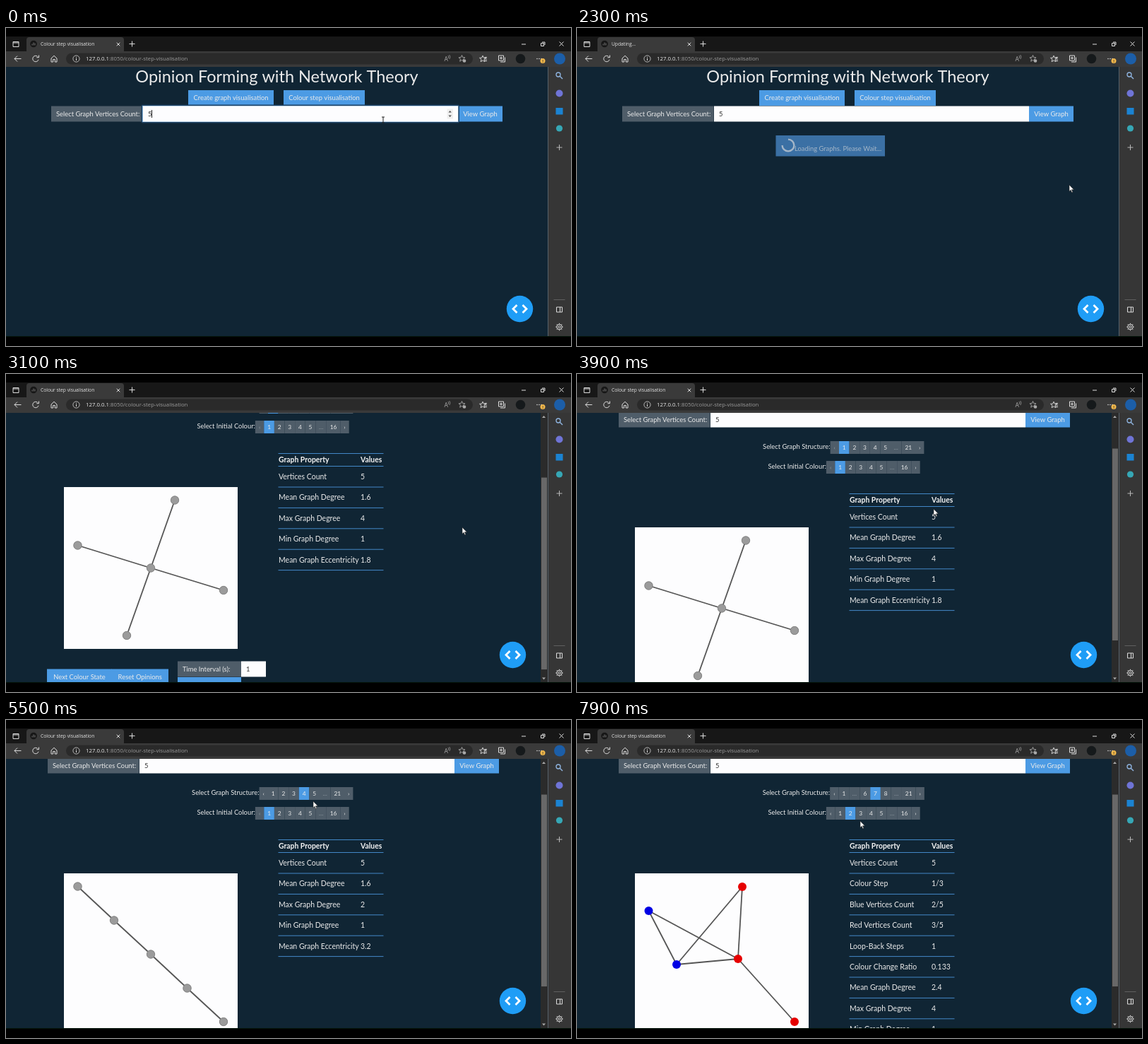
Recreate the animation shown at these times as an HTML page with a canvas. Size 800 px wide and 450 px high, loop 8 s.

```html
<!DOCTYPE html>
<html lang="en">
<head>
<meta charset="utf-8">
<title>Colour step visualisation</title>
<style>
html, body { margin: 0; width: 100%; height: 100%; overflow: hidden; background: #000; }
canvas { display: block; }
</style>
</head>
<body>
<canvas id="stage" width="800" height="450"></canvas>
<script>
const ctx = document.getElementById('stage').getContext('2d');
const LOOP = 8000, LOADED = 2500;
const LATO = 'Lato, sans-serif', UI = '"Open Sans", sans-serif';
const BG = '#102534', BLUE = '#4c9be4', BLUE_HOVER = '#4184c3', GREY = '#4f5d69', LIGHT = '#ebebeb';

// [time, x, y] of the pointer tip; [time, offset] of the page scroll
const POINTER = [[0, 534, 130], [200, 534, 130], [800, 668, 124], [1200, 670, 124], [1700, 688, 180],
  [2300, 697, 222], [2600, 694, 222], [2700, 694, 222], [3100, 646, 217], [3300, 642, 216], [3400, 642, 216],
  [3900, 505, 191], [4400, 394, 105], [4800, 394, 105], [4900, 408, 105], [5100, 408, 105], [5200, 422, 105],
  [5300, 424, 106], [5500, 435, 115], [5650, 438, 107], [6300, 440, 106], [6600, 444, 105], [6900, 440, 105],
  [7300, 388, 132], [7550, 388, 132], [7900, 401, 143]];
const SCROLL = [[2700, 0], [3000, 114], [3400, 114], [3700, 57]];
const CLICKS = [4600, 5000, 5300, 5700, 6100, 6900];
const COLOUR_CLICK = 7500;

// Vertex positions are on screen at a scroll of 57
const GRAPHS = [
  { at: [[205, 331.5], [239, 235.5], [101.5, 299.5], [308, 363], [171, 427]], edges: '01 02 03 04', stats: ['1.6', 4, 1, '1.8'] },
  { at: [[180, 318], [101.5, 270], [214, 235.5], [238, 370], [308, 427]], edges: '01 02 03 34', stats: ['1.6', 3, 1, '2.6'] },
  { at: [[201, 326], [101.5, 290], [146, 235.5], [308, 345], [220, 427]], edges: '01 02 12 03 04', stats: ['2', 4, 1, '1.8'] },
  { at: [[101.5, 235.5], [153, 283.5], [205, 331.5], [256.5, 379.5], [308, 427]], edges: '01 12 23 34', stats: ['1.6', 2, 1, '3.2'] },
  { at: [[165, 302], [235, 345], [172, 380], [101.5, 235.5], [308, 427]], edges: '01 12 02 03 14', stats: ['2', 3, 1, '2.4'] },
  { at: [[138, 246.5], [308, 235.5], [227, 292.5], [101.5, 380.5], [190, 427]], edges: '02 12 03 34 24', stats: ['2', 3, 1, '2.4'] },
  { at: [[101.5, 270], [141, 346], [234, 236], [228, 338], [308, 427]], edges: '01 03 12 13 23 34', stats: ['2.4', 4, 1, '1.8'] },
];
const OPINIONS = ['#0000e4', '#0000e4', '#e60000', '#e60000', '#e60000'];

function track(keys, t) {
  const next = keys.findIndex(k => k[0] > t);
  if (next === 0) return keys[0].slice(1);
  if (next < 0) return keys[keys.length - 1].slice(1);
  const a = keys[next - 1], b = keys[next];
  const u = (t - a[0]) / (b[0] - a[0]), e = u * u * (3 - 2 * u);
  return a.slice(1).map((v, i) => v + (b[i + 1] - v) * e);
}

function rect(x0, y0, x1, y1, fill) {
  ctx.fillStyle = fill;
  ctx.fillRect(x0, y0, x1 - x0, y1 - y0);
}
function round(x0, y0, x1, y1, r, fill) {
  ctx.beginPath();
  ctx.roundRect(x0, y0, x1 - x0, y1 - y0, r);
  ctx.fillStyle = fill;
  ctx.fill();
}
function disc(x, y, r, fill) {
  ctx.beginPath();
  ctx.arc(x, y, r, 0, 7);
  ctx.fillStyle = fill;
  ctx.fill();
}
function arc(x, y, r, from, to, color, width = 1) {
  ctx.beginPath();
  ctx.arc(x, y, r, from, to);
  ctx.strokeStyle = color;
  ctx.lineWidth = width;
  ctx.stroke();
}
function shape(d, x, y, { fill, stroke, width = 1 }) {
  const path = new Path2D(d);
  ctx.save();
  ctx.translate(x, y);
  if (fill) { ctx.fillStyle = fill; ctx.fill(path); }
  if (stroke) { ctx.strokeStyle = stroke; ctx.lineWidth = width; ctx.stroke(path); }
  ctx.restore();
}
function text(s, x, cy, { size = 9.4, color = LIGHT, align = 'left', family = LATO, weight = 400 } = {}) {
  ctx.font = `${weight} ${size}px ${family}`;
  ctx.textAlign = align;
  ctx.fillStyle = color;
  ctx.fillText(s, x, cy + size * 0.36);
}

function icon(d, x, y, stroke = '#dcdcdc', width = 1) {
  shape(d, x, y, { stroke, width });
}

function drawBrowser(title) {
  rect(0, 0, 800, 450, '#000');
  rect(0, 12, 800, 34, '#171717');
  round(29, 13, 167, 36, 4, '#3a3a3a');
  rect(0, 33, 800, 55, '#3a3a3a');
  rect(768, 55, 800, 436, '#363636');
  round(85, 35.5, 661, 51.5, 8, '#2a2a2a');

  icon('M-4-3.5H4V3.5H-4ZM-4-2H4', 14, 23);
  disc(39, 22.5, 4.8, '#161616');
  icon('M-2 2V0M0 2V-2M2 2V-1', 39, 22.5, '#888', 0.8);
  text(title, 49, 23, { size: 6.7, family: UI, color: '#e4e4e4' });
  icon('M-2.3-2.3 2.3 2.3M2.3-2.3-2.3 2.3', 159, 23);
  icon('M-4 0H4M0-4V4', 178.5, 22.5);
  icon('M-3 0H3', 733, 23);
  icon('M-2.5-1H1.5V3H-2.5ZM-1-2.5H3V1.5', 760, 22.5);
  icon('M-3-3 3 3M3-3-3 3', 786.5, 22.5);

  icon('M5 0H-4.5M-.5-4-4.5 0-.5 4', 16.5, 43.5);
  arc(42, 43.5, 4.2, 0.3, 5.6, '#dcdcdc');
  icon('M4.5-5V-1.8H1.3', 42, 43.5);
  icon('M-4-.5 0-4.3 4-.5V4.5H1.3V1H-1.3V4.5H-4Z', 68, 43.5);
  arc(99.5, 43.5, 4.6, 0, 7, '#c8c8c8', 0.9);
  icon('M0-.8V2.5M0-2.7V-1.7', 99.5, 43.5);
  text('127.0.0.1', 113, 43.5, { size: 7.8, family: UI, color: '#eee' });
  const host = ctx.measureText('127.0.0.1').width;
  text(':8050/colour-step-visualisation', 113 + host, 43.5, { size: 7.8, family: UI, color: '#9c9c9c' });

  text('A', 620.5, 44, { size: 8.5, family: UI, color: '#aaa' });
  icon('M0-2Q1.5 0 0 2M1.8-3Q4 0 1.8 3', 626, 41, '#aaa', 0.7);
  const star = 'M0-4.5 1.3-1.4 4.5-1.2 2 .9 2.8 4.2 0 2.4-2.8 4.2-2 .9-4.5-1.2-1.3-1.4Z';
  icon(star, 645.5, 43, '#aaa', 0.9);
  disc(649, 46.5, 2.3, '#aaa');
  icon(star, 675, 43.5, '#dcdcdc', 0.9);
  icon('M1.5-2H5M1.5.5H5M2 3H5', 676, 43.5);
  icon('M-4.5-4.5H2.5V2.5H-4.5ZM-2 4.5H4.5V-2M-1-3V1M-3-1H1', 702, 43.5);
  disc(728.5, 43.5, 6.8, '#15191b');
  for (let i = 0; i < 3; i++) disc(752 + i * 3, 43.5, 0.8, '#dcdcdc');
  disc(760, 46.5, 3.5, '#f2b84b');
  text('!', 760, 46.5, { size: 6, align: 'center', color: '#222', weight: 700 });
  disc(784, 43.5, 8, '#1c5ea8');

  arc(782, 66, 3, 0, 7, '#8fb4e0', 1.3);
  icon('M0 0 4 4', 784, 68, '#8fb4e0', 1.5);
  disc(783.5, 92.5, 5, '#6f74d6');
  rect(778.5, 113, 788.5, 122.5, '#1b83d2');
  disc(783.5, 142, 4.6, '#36a7b5');
  icon('M-4 0H4M0-4V4', 783.5, 169, '#b8b8b8');
  icon('M-8 0H8', 783.5, 384.5, '#606060');
  icon('M-4-3.5H4V3.5H-4ZM1-3.5V3.5', 783.5, 398.5);
  arc(783.5, 423, 1.6, 0, 7, '#dcdcdc');
  arc(783.5, 423, 3.8, 0, 7, '#dcdcdc');
  for (let i = 0; i < 8; i++) {
    const a = i * Math.PI / 4, c = Math.cos(a), s = Math.sin(a);
    icon(`M${c * 3.8} ${s * 3.8}L${c * 5.2} ${s * 5.2}`, 783.5, 423);
  }
  rect(0, 436, 800, 437, '#04150a');
}

function drawPage(t) {
  const loaded = t >= LOADED, focused = t < 1000;
  const scroll = track(SCROLL, t)[0];
  const pointer = track(POINTER, t);
  const shift = loaded ? -5 : 0;
  let cursor = 'arrow';
  const over = (x0, y0, x1, y1) => pointer[0] >= x0 && pointer[0] < x1 && pointer[1] >= y0 && pointer[1] < y1;

  function button(x0, y0, x1, y1, label) {
    const hover = over(x0, y0, x1, y1);
    if (hover) cursor = 'hand';
    rect(x0, y0, x1, y1, hover ? BLUE_HOVER : BLUE);
    text(label, (x0 + x1) / 2, (y0 + y1) / 2, { align: 'center' });
  }

  function pagination(label, center, y, active, last) {
    const pages = active < 5 ? ['‹', 1, 2, 3, 4, 5, '…', last, '›']
      : ['‹', 1, '…', active - 1, active, active + 1, '…', last, '›'];
    const widthOf = p => p === '…' ? 15.5 : p === '‹' || p === '›' ? 12.4 : p > 9 ? 19.5 : 14.6;
    let x = center - pages.reduce((sum, p) => sum + widthOf(p), 0) / 2;
    text(label, x, y - 1.5, { align: 'right' });
    for (const p of pages) {
      const w = widthOf(p), dull = p === '…' || (p === '‹' && active === 1);
      const hover = !dull && over(x, y - 9, x + w, y + 9);
      if (hover) cursor = 'hand';
      rect(x, y - 9, x + w, y + 9, p === active ? BLUE : hover ? '#7b868e' : GREY);
      text(p, x + w / 2, y, { size: 8.4, align: 'center', color: dull ? '#97a0a8' : LIGHT });
      x += w;
    }
  }

  function drawGraph(graph, coloured) {
    rect(82, 274, 328, 503, '#fdfdfe');
    ctx.save();
    ctx.translate(0, 57);
    for (const [a, b] of graph.edges.split(' ')) {
      const [p, q] = [graph.at[a], graph.at[b]];
      icon(`M${p}L${q}`, 0, 0, '#555', 1.8);
    }
    graph.at.forEach(([x, y], i) => {
      disc(x, y, 6, coloured ? OPINIONS[i] : '#9b9b9b');
      if (!coloured) arc(x, y, 5.7, 0, 7, '#7c7c7c', 0.8);
    });
    ctx.restore();
  }

  function drawTable(stats, coloured) {
    const rows = [['Vertices Count', 5]];
    if (coloured) rows.push(['Colour Step', '1/3'], ['Blue Vertices Count', '2/5'], ['Red Vertices Count', '3/5'],
      ['Loop-Back Steps', 1], ['Colour Change Ratio', '0.133']);
    ['Mean Graph Degree', 'Max Graph Degree', 'Min Graph Degree', 'Mean Graph Eccentricity']
      .forEach((name, i) => rows.push([name, stats[i]]));
    const rule = y => rect(385.5, y - 0.5, 534.5, y + 0.5, '#4388c8');
    const head = { size: 10.4, weight: 700, color: '#f4f4f4' };
    rule(226.5);
    text('Graph Property', 386, 235.5, head);
    text('Values', 502, 235.5, head);
    rule(244.5);
    rows.forEach(([name, value], i) => {
      const y = 259.3 + i * 29.4;
      text(name, 386, y, { size: 10.5 });
      text(value, 502, y, { size: 10.5 });
      rule(y + 14.7);
    });
  }

  ctx.save();
  ctx.beginPath();
  ctx.rect(0, 55, 768, 381);
  ctx.clip();
  rect(0, 55, 768, 436, BG);

  ctx.save();
  ctx.translate(0, -scroll);
  pointer[1] += scroll;
  text('Opinion Forming with Network Theory', 383.5 + shift, 69, { size: 23.5, align: 'center' });
  button(258 + shift, 88, 379 + shift, 110, 'Create graph visualisation');
  button(393 + shift, 88, 508 + shift, 110, 'Colour step visualisation');
  rect(64 + shift, 110.5, 193.5 + shift, 132.5, GREY);
  text('Select Graph Vertices Count:', 71 + shift, 121.5);
  button(640 + shift, 110.5, 703 + shift, 132.5, 'View Graph');
  if (focused) {
    round(191.5, 108.5, 642, 134.5, 2, '#1f4364');
    rect(193, 110, 640.5, 133, '#8fb8de');
  }
  rect(194 + shift, 110.5, 640 + shift, 132.5, '#fdfdfe');
  text('5', 201 + shift, 121.5, { color: '#333' });
  if (over(194 + shift, 110.5, 640 + shift, 132.5)) cursor = 'beam';
  if (focused) {
    if (t % 1000 < 500) rect(206, 116, 207, 127, '#222');
    rect(624.5, 114.5, 633, 128.5, '#efefef');
    shape('M-2.2-2 0-4.6 2.2-2ZM-2.2 2 0 4.6 2.2 2Z', 628.7, 121.5, { fill: '#505050' });
  }

  if (t >= 1200 && !loaded) {
    rect(281.5, 152, 436, 181.5, '#3b70a4');
    const spin = (t - 2300) / 750 * Math.PI * 2 + Math.PI * 1.5;
    arc(299, 166, 8.4, spin, spin + Math.PI * 1.5, '#a4b6c8', 2.4);
    text('Loading Graphs. Please Wait...', 308, 170.5, { color: '#a4b6c8' });
  }

  if (loaded) {
    const structure = 1 + CLICKS.filter(c => t >= c).length;
    const coloured = t >= COLOUR_CLICK;
    const graph = GRAPHS[structure - 1];
    pagination('Select Graph Structure:', 425, 161, structure, 21);
    pagination('Select Initial Colour:', 419.3, 189, coloured ? 2 : 1, 16);
    drawGraph(graph, coloured);
    drawTable(graph.stats, coloured);
    button(58, 531.5, 150, 553.5, 'Next Colour State');
    button(149.5, 531.5, 230, 553.5, 'Reset Opinions');
    rect(243, 520.5, 333, 542.5, GREY);
    text('Time Interval (s):', 250, 531.5);
    rect(333, 520.5, 368, 542.5, '#fdfdfe');
    text('1', 340, 531.5, { color: '#333' });
    button(243, 543, 333, 565, 'Start Auto Steps');
  }
  pointer[1] -= scroll;
  ctx.restore();

  const menuX = loaded ? 717.5 : 727.5;
  disc(menuX, 397.5, 18.7, '#1f9df6');
  icon('M-4-5.5-9.5 0-4 5.5M4-5.5 9.5 0 4 5.5', menuX, 397.5, '#fff', 2.8);

  if (loaded) {
    rect(757, 55, 768, 436, '#2b2b2b');
    const top = 64.5 + scroll * 0.72;
    rect(758, top, 766, top + 271.5, '#686868');
    shape('M-2.5 1.5 0-1.5 2.5 1.5Z', 761.5, 60.5, { fill: '#aaa' });
    shape('M-2.5-1.5 0 1.5 2.5-1.5Z', 761.5, 431, { fill: '#aaa' });
  }
  rect(767, 55, 768, 436, '#56616a');
  ctx.restore();
  drawPointer(cursor, ...pointer);
}

function drawPointer(kind, x, y) {
  if (kind === 'beam') {
    icon('M-2-4H2M0-4V4M-2 4H2', x, y, '#222', 1);
  } else if (kind === 'hand') {
    shape('M-1 1Q0-1 1 1V5L5 6Q6.5 6.5 6 9L5 13H0L-3 8.5Q-3 7-1 8Z', x, y, { fill: '#fff', stroke: '#222', width: 0.7 });
  } else {
    shape('M0 0V9.2L2.1 7.3 3.6 10.8 5 10.2 3.5 6.8H6.5Z', x, y, { fill: '#fff', stroke: '#222', width: 0.6 });
  }
}

function frame() {
  const t = Math.floor(performance.now() % LOOP / 100) * 100;
  drawBrowser(t >= 1000 && t < LOADED ? 'Updating...' : 'Colour step visualisation');
  drawPage(t);
  requestAnimationFrame(frame);
}
frame();
</script>
</body>
</html>
```
